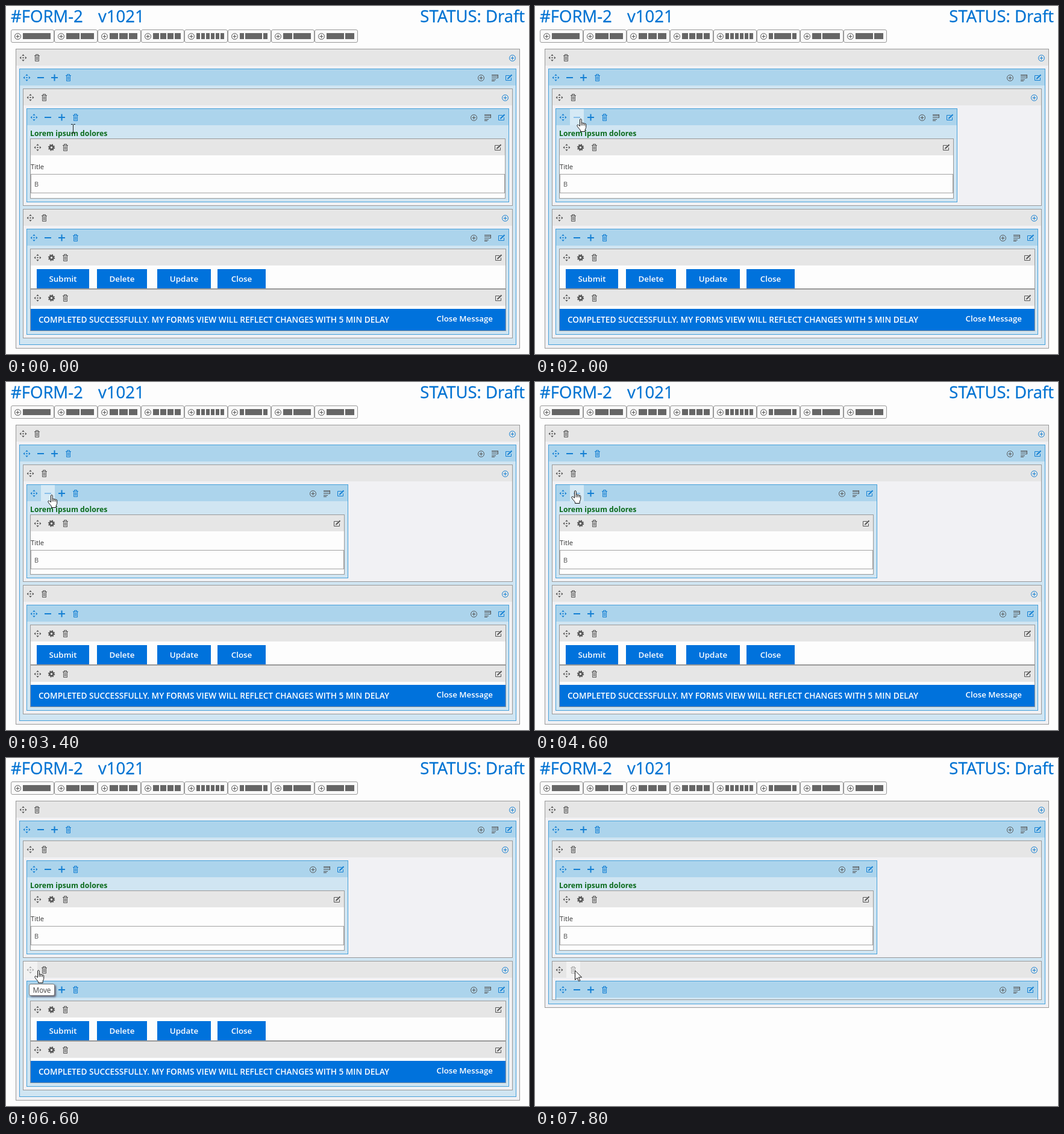
Recreate the animation shown at these times as an HTML page. Size 868x578 px, loop 8 s.

```html
<!DOCTYPE html>
<html lang="en">
<head>
<meta charset="utf-8">
<title>Form editor</title>
<style>
* { box-sizing: border-box; }
html, body { margin: 0; width: 100%; height: 100%; overflow: hidden; background: #fdfdfd; }
body { position: relative; font: 12px/20px "Open Sans", "Noto Sans", sans-serif; color: #333; }
svg { display: block; overflow: visible; }

.title { position: absolute; top: 0; font-size: 27.5px; line-height: 33px; color: #0072d2;
  white-space: pre; -webkit-text-stroke: .3px #0072d2; }

.layouts { position: absolute; left: 8px; top: 39px; display: flex; }
.layout { width: 72px; height: 22px; border: 1px solid #999; border-radius: 3px; background: #f9f9f9;
  position: relative; color: #555; }
.layout svg { position: absolute; left: -1px; top: -4px; }
.cols { position: absolute; left: 19px; top: 5px; width: 46px; height: 10px; display: flex; gap: 2px; }
.cols i { background: #666; flex-basis: 0; }

.box { position: absolute; left: 5px; right: 5px; border: 1px solid #999; }
.row { background: #f1f1f4; }
.col { background: #d0e5f2; border-color: #45a0da; }
.field { background: #fdfdfd; }
.bar { display: flex; height: 27px; background: #e6e6e6; color: #555; }
.col > .bar { background: #acd4ec; }
.bar svg { flex: none; }
.bar .gap { flex: 1; }
.blue { color: #137fd3; }

.hover { position: absolute; top: 0; width: 23px; height: 27px; background: rgba(255,255,255,.5); }
.text { position: absolute; white-space: nowrap; }
.input { position: absolute; left: 0; right: 0; top: 58px; height: 32px; border: 1px solid #a3a3a3;
  padding: 6px 5px; font-size: 11px; color: #555; }
.btn { position: absolute; top: 33px; height: 32px; line-height: 32px; text-align: center;
  font-size: 13.4px; font-weight: 600; color: #fff; background: #0072dc; }
.banner { position: absolute; left: 0; right: 0; top: 32px; height: 36px; line-height: 36px;
  background: #0072dc; color: #fff; font-size: 13.65px; font-weight: 600; }

.tip { position: absolute; top: 375px; height: 20px; line-height: 18px; text-align: center;
  font-size: 11.7px; color: #444; background: #fdfdfd; border: 1px solid #777; border-radius: 3px;
  box-shadow: 2px 2px 3px #667; white-space: nowrap; }

.pointer { position: absolute; left: 0; top: 0; }
.pointer svg { position: absolute; }

/* one tick = 200 ms = 2.5% */
.shrink, .form, .last, .hover, .tip, .pointer, .pointer svg { animation: 8s step-end infinite; }
.shrink { animation-name: shrink; }
.form { animation-name: form; }
.last { animation-name: last; }
.onMinus { animation-name: onMinus; }
.onMove { animation-name: onMove; }
.onTrash { animation-name: onTrash; }
.tipMove { animation-name: tipMove; }
.tipTrash { animation-name: tipTrash; }
.pointer { animation-name: travel; }
.pointer .beam { animation-name: beam; }
.pointer .hand { animation-name: hand; }
.pointer .arrow { animation-name: arrow; }

@keyframes shrink {
  0% { width: 801px; } 15% { width: 734px; } 25% { width: 667px; }
  32.5% { width: 601px; } 40%, 100% { width: 534px; }
}
@keyframes form { 0% { height: 498px; } 95% { height: 476px; } 97.5%, 100% { height: 344px; } }
@keyframes last { 0% { height: 215px; } 95% { height: 194px; } 97.5%, 100% { height: 65px; } }
@keyframes onMinus { 0% { opacity: 0; } 7.5% { opacity: 1; } 65%, 100% { opacity: 0; } }
@keyframes onMove { 0% { opacity: 0; } 75% { opacity: 1; } 85%, 100% { opacity: 0; } }
@keyframes onTrash { 0% { opacity: 0; } 85%, 100% { opacity: 1; } }
@keyframes tipMove { 0% { opacity: 0; } 80% { opacity: .6; } 82.5% { opacity: 1; } 85% { opacity: .5; } 87.5%, 100% { opacity: 0; } }
@keyframes tipTrash {
  0% { opacity: 0; }
  90% { opacity: .6; }
  92.5% { opacity: 1; }
  95% { opacity: 1; color: transparent; background: transparent; border-color: transparent; }
  97.5%, 100% { opacity: 0; }
}
@keyframes travel {
  0% { transform: translate(111px, 204px); }
  2.5% { transform: translate(101px, 200px); }
  5% { transform: translate(85px, 192px); }
  7.5% { transform: translate(75px, 187px); }
  50% { transform: translate(74px, 186px); }
  52.5% { transform: translate(72px, 185px); }
  55% { transform: translate(69px, 182px); }
  57.5% { transform: translate(66px, 180px); }
  62.5% { transform: translate(66px, 182px); }
  65% { transform: translate(65px, 199px); }
  67.5% { transform: translate(63px, 232px); }
  70% { transform: translate(60px, 275px); }
  72.5% { transform: translate(57px, 318px); }
  75% { transform: translate(54px, 345px); }
  77.5% { transform: translate(53px, 352px); }
  85% { transform: translate(60px, 352px); }
  87.5%, 100% { transform: translate(67px, 352px); }
}
@keyframes beam { 0% { opacity: 1; } 5%, 100% { opacity: 0; } }
@keyframes hand { 0% { opacity: 0; } 5% { opacity: 1; } 65% { opacity: 0; } 75% { opacity: 1; } 97.5%, 100% { opacity: 0; } }
@keyframes arrow { 0% { opacity: 0; } 65% { opacity: 1; } 75% { opacity: 0; } 97.5%, 100% { opacity: 1; } }
</style>
</head>
<body>

<svg width="0" height="0" style="position:absolute" fill="none" stroke="none">
  <symbol id="move" viewBox="0 0 23 27">
    <path fill="currentColor" d="M11.5 8l2.2 2.7H9.3zM11.5 20l2.2-2.7H9.3zM5.5 14l2.7-2.2v4.4zM17.5 14l-2.7-2.2v4.4zM10.5 13h2v2h-2z"/>
  </symbol>
  <symbol id="minus" viewBox="0 0 23 27"><path fill="currentColor" d="M6 13h11v2H6z"/></symbol>
  <symbol id="plus" viewBox="0 0 23 27"><path fill="currentColor" d="M6 13h11v2H6zM10.5 8.5h2v11h-2z"/></symbol>
  <symbol id="trash" viewBox="0 0 23 27">
    <path stroke="currentColor" fill="none" d="M7 10.5h9M9.5 10V8.5h4V10M8.5 11v8.5h6V11M10.5 12v6M12.5 12v6"/>
  </symbol>
  <symbol id="gear" viewBox="0 0 23 27">
    <circle cx="11.5" cy="14" r="3.1" fill="none" stroke="currentColor" stroke-width="2.6"/>
    <circle cx="11.5" cy="14" r="4.9" fill="none" stroke="currentColor" stroke-width="1.6" stroke-dasharray="1.95 1.9"/>
  </symbol>
  <symbol id="add" viewBox="0 0 23 27">
    <circle cx="11.5" cy="14.5" r="5" fill="none" stroke="currentColor"/>
    <path stroke="currentColor" d="M8.5 14.5h6M11.5 11.5v6"/>
  </symbol>
  <symbol id="list" viewBox="0 0 23 27">
    <path fill="none" stroke="currentColor" d="M6 9.5h11M6 11.5h11M16.5 9v5M6 14.5h11M6 17.5h7M6 19.5h5"/>
  </symbol>
  <symbol id="edit" viewBox="0 0 23 27">
    <path fill="none" stroke="currentColor" d="M13 10.5H6.500v8h9V14"/>
    <path stroke="currentColor" stroke-width="2" d="M10.300 15.200l6.200-6"/>
    <path fill="currentColor" d="M8.800 16.700l.7-2.500 1.800 1.800z"/>
  </symbol>
</svg>

<div class="title" style="left:8px">#FORM-2</div>
<div class="title" style="left:153px">v1021</div>
<div class="title" style="right:7px">STATUS: Draft</div>
<div class="layouts"></div>

<div class="box row form" style="left:16px;right:auto;width:837px;top:71px">
  <div class="bar" data-icons="move trash | add*"></div>
  <div class="box col" style="top:32px;bottom:5px">
    <div class="bar" data-icons="move* minus* plus* trash* | add list edit*"></div>

    <div class="box row" style="top:32px;height:195px">
      <div class="bar" data-icons="move trash | add*"></div>
      <div class="box col shrink" style="right:auto;top:32px;height:156px">
        <div class="bar" data-icons="move* minus* plus* trash* | add list edit*"></div>
        <div class="hover onMinus" style="left:23px"></div>
        <div class="text" style="left:5px;top:31px;font-size:12.25px;font-weight:700;color:#0b6b1c">Lorem ipsum dolores</div>
        <div class="box field" style="top:49px;height:100px">
          <div class="bar" data-icons="move gear trash | edit"></div>
          <div class="text" style="left:0;top:36px;font-size:11.2px">Title</div>
          <div class="input">B</div>
        </div>
      </div>
    </div>

    <div class="box row last" style="top:232px;overflow:hidden">
      <div class="bar" data-icons="move trash | add*"></div>
      <div class="hover onMove" style="left:0"></div>
      <div class="hover onTrash" style="left:23px"></div>
      <div class="box col" style="top:32px;height:176px">
        <div class="bar" data-icons="move* minus* plus* trash* | add list edit*"></div>
        <div class="box field" style="top:32px;right:4px;height:67px">
          <div class="bar" data-icons="move gear trash | edit"></div>
          <div class="btn" style="left:10px;width:87px">Submit</div>
          <div class="btn" style="left:110px;width:83px">Delete</div>
          <div class="btn" style="left:210px;width:89px">Update</div>
          <div class="btn" style="left:310px;width:80px">Close</div>
        </div>
        <div class="box field" style="top:99px;right:4px;height:70px">
          <div class="bar" data-icons="move gear trash | edit"></div>
          <div class="banner">
            <span class="text" style="left:13px">COMPLETED SUCCESSFULLY. MY FORMS VIEW WILL REFLECT CHANGES WITH 5 MIN DELAY</span>
            <span class="text" style="right:21px;top:-2px;font-size:13.3px">Close Message</span>
          </div>
        </div>
      </div>
    </div>
  </div>
</div>

<div class="tip tipMove" style="left:38px;width:43px">Move</div>
<div class="tip tipTrash" style="left:58px;width:75px">Delete row</div>

<div class="pointer">
  <svg class="beam" style="left:-4px;top:-8px" width="8" height="16" fill="none" stroke="#222">
    <path d="M1 .5h2.500l1 1 1-1H8M4.500 1v14M1 15.500h2.500l1-1 1 1H8"/>
  </svg>
  <svg class="hand" style="left:-6px;top:0" width="17" height="22" fill="#fff" stroke="#111" stroke-linejoin="round">
    <path d="M5.500 12.500V1.800c0-1.600 2.700-1.600 2.700 0v5.700c.3-1 2.500-.8 2.600.5.400-.9 2.400-.7 2.600.6.500-.7 2.300-.4 2.300 1v4.800c0 2-1.600 3-1.600 4.800v2.300H6.500v-2C5.400 17.800 1 13.600.8 11.700.6 10.200 2.500 9.800 3.600 11z"/>
    <path d="M8.200 7.500v4M10.800 8v3.500M13.400 8.600v3"/>
  </svg>
  <svg class="arrow" style="left:-1px;top:0" width="13" height="20" fill="#fff" stroke="#111">
    <path d="M.5 1v15.500l3.600-3.400 2.500 5.600 2.300-1-2.500-5.500h5.100z"/>
  </svg>
</div>

<script>
const icon = (name, cls = "") =>
  `<svg class="${cls}" width="23" height="27"><use href="#${name}"/></svg>`;

// "*" marks a blue icon, "|" pushes the rest to the right edge
for (const bar of document.querySelectorAll(".bar")) {
  bar.innerHTML = bar.dataset.icons.split(" ").map(s =>
    s === "|" ? '<span class="gap"></span>' : icon(s.replace("*", ""), s.endsWith("*") ? "blue" : "")
  ).join("");
}

const layouts = ["1", "11", "111", "1111", "111111", "141", "12", "21"];
document.querySelector(".layouts").innerHTML = layouts.map(cols =>
  `<div class="layout">${icon("add")}<div class="cols">` +
  [...cols].map(n => `<i style="flex-grow:${n}"></i>`).join("") + "</div></div>"
).join("");
</script>
</body>
</html>
```
